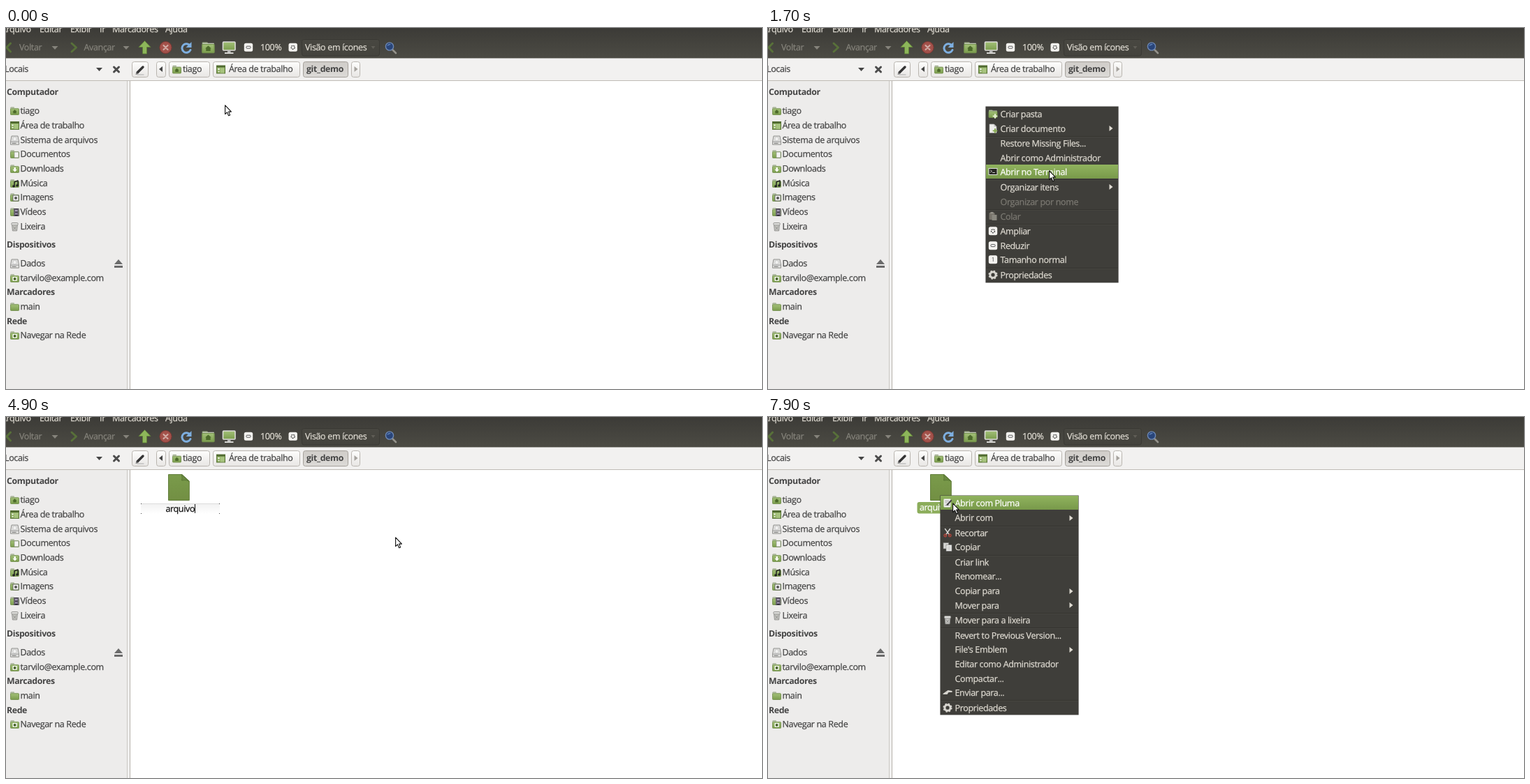
Animation of 1082 by 518 pixels, one loop 8000 ms. Source, as an HTML page:

```html
<!DOCTYPE html>
<html lang="pt-BR">
<head>
<meta charset="utf-8">
<title>Criar arquivo</title>
<style>
html, body { margin: 0; width: 100%; height: 100%; overflow: hidden; background: #fff; }
svg { display: block; width: 100vw; height: 100vh; }
text { --ink: #444; font: 12.5px "Open Sans", "Noto Sans", sans-serif; letter-spacing: -.35px; fill: var(--ink); stroke: var(--ink); stroke-width: .25px; text-rendering: geometricPrecision; white-space: pre; }
.bold { font-weight: 700; font-size: 12.3px; stroke: none; }
.light { --ink: #dfdbd2; }
.dim { --ink: #85837b; }
.off { --ink: #7b7972; }
.mid { --ink: #111; text-anchor: middle; }
.hot { --ink: #fff; }
</style>
</head>
<body>
<svg id="stage" viewBox="0 0 1082 518" preserveAspectRatio="none"></svg>
<script>
const LOOP = 8000;

// Drawing helpers
const rect = (x, y, w, h, fill, more = '') =>
  `<rect x="${x}" y="${y}" width="${w}" height="${h}" fill="${fill}" ${more}/>`;
const path = (d, fill, more = '') => `<path d="${d}" fill="${fill}" ${more}/>`;
const line = (d, color, width = 1) =>
  path(d, 'none', `stroke="${color}" stroke-width="${width}" stroke-linecap="round" stroke-linejoin="round"`);
const disc = (x, y, r, fill, more = '') => `<circle cx="${x}" cy="${y}" r="${r}" fill="${fill}" ${more}/>`;
const text = (x, y, s, cls = '', more = '') => `<text x="${x}" y="${y}" class="${cls}" ${more}>${s}</text>`;
const group = (id, body) => `<g id="${id}">${body}</g>`;
const place = (x, y, body) => `<g transform="translate(${x} ${y})">${body}</g>`;
const fade = (id, a, b) =>
  `<linearGradient id="${id}" x2="0" y2="1"><stop stop-color="${a}"/><stop offset="1" stop-color="${b}"/></linearGradient>`;
const base = c => Math.round(c + 4.3);

const down = (x, y, color) => path(`M${x} ${y}h9l-4.5 5z`, color);
const side = (x, y, color) => path(`M${x} ${y - 4}v8l5 -4z`, color);

// Icons are drawn in a 13 x 12 box
const house = path('M6.5 4.2L9.5 7H8.7V9.6H4.3V7H3.5z', '#4c6a2a');
const folder = rect(.5, .5, 5.5, 4, '#8a9a74', 'rx=".8"') + rect(1, 1.6, 11.2, 3, '#dfe3d8') +
  rect(.5, 2.8, 12, 8.7, 'url(#leaf)', 'rx=".8" stroke="#738f4d" stroke-width=".9"');
const trash = path('M2.6 3.5H10.4L9.6 12H3.4z', '#c4c4c0', 'stroke="#858582" stroke-width=".8"') +
  rect(1.8, .5, 9.4, 3.4, '#dededb', 'rx="1.4" stroke="#858582" stroke-width=".8"') +
  line('M4.500 6l3.500 4M8.500 6l-3.500 4', '#8b8b88', .9);
const sheet = path('M1.5 0H8L11.5 3.5V12.5H1.5z', '#eeeeec', 'stroke="#aaa" stroke-width=".7"') +
  path('M8 0V3.5H11.5z', '#bbb');
const plus = line('M9.5 7v5M7 9.5h5', '#e7f3d4', 2);
const knob = mark => rect(.3, .3, 12.4, 12, '#f3f2ef', 'rx="2.5"') + mark;
const gear = disc(6.5, 6.2, 4.1, 'none', 'stroke="#d8d6d0" stroke-width="3"') +
  disc(6.5, 6.2, 5.7, 'none', 'stroke="#d8d6d0" stroke-width="1.8" stroke-dasharray="2.3 2.2"');
const zoomIn = knob(disc(6.5, 6.3, 2.5, 'none', 'stroke="#444" stroke-width="1.4" stroke-dasharray="2 1"'));
const zoomOut = knob(rect(3.5, 4.7, 6, 3, '#fff', 'rx="1" stroke="#555"'));

const icon = {
  home: folder + house,
  desk: rect(.5, .5, 12, 11, 'url(#leaf)', 'stroke="#5d773c"') + rect(.5, .5, 12, 2.5, '#506a30') +
    rect(2.5, 4.5, 2, 2, '#fff') + rect(2.5, 8, 2, 2, '#e4edd6') + rect(5.5, 4, 6, 7, '#a7c37f'),
  drive: path('M2 0H11L12.5 8V12.3H.5V8z', '#dededc', 'stroke="#8b8b88" stroke-width=".9"') +
    line('M1 8.2h11', '#999') + line('M3 10.4h5', '#777') + disc(6.5, 4.2, 2.6, '#f2f2f1', 'stroke="#bbb" stroke-width=".6"'),
  docs: folder + rect(6, 3, 6, 8, '#f4f4f2', 'stroke="#8a8a88" stroke-width=".6"'),
  down: folder + path('M5.5 4h2.4v3h2l-3.2 3.6L3.5 7h2z', '#fff'),
  music: folder + line('M6 10V4l5 -2v7', '#222', 1.5) + disc(5, 10, 1.8, '#222') + disc(10, 9, 1.8, '#222'),
  photo: folder + rect(4, 3, 8, 8, '#f2f2f0', 'stroke="#555" stroke-width=".8"') + disc(8, 7, 2, '#555'),
  film: folder + rect(5, 1, 7.5, 11, '#35313c') + rect(7, 2.5, 3.5, 3, '#a79bb6') + rect(7, 7, 3.5, 3, '#8d819d') +
    line('M6 2v9M11.6 2v9', '#ddd', .6),
  net: folder + rect(3.4, 4, 6.4, 6, '#f2f5ec', 'rx="1"') + disc(6.6, 7, 1.9, '#46602a'),
  trash, folder, gear, zoomIn, zoomOut,
  newFolder: folder + plus,
  newDoc: sheet + line('M9.5 7v5M7 9.5h5', '#86a850', 2),
  sheet,
  term: rect(.5, 1.5, 12, 9, '#262622', 'stroke="#ddd"') + line('M3 4l2 1.5l-2 1.5M6 7.5h3', '#ddd', .9),
  paste: rect(1, 1, 8, 10, '#77736a', 'rx="1"') + rect(5, 4, 7, 8, '#8a887f') + rect(3, 0, 4, 2.5, '#96938a'),
  zoomOne: knob(line('M5.6 4l1.2 -.8v5.5', '#777', 1)),
  edit: rect(1, .5, 10, 12, '#eee', 'rx="1"') + line('M3 3.5h5M3 6h3M3 9.5h6', '#999') + line('M11.5 3L6 9', '#444', 2.2),
  cut: line('M3 .5L9 9M10 .5L4 9', '#d5d5d2', 1.5) + disc(3.2, 10, 1.7, 'none', 'stroke="#b0443b" stroke-width="1.4"') +
    disc(9.8, 10, 1.7, 'none', 'stroke="#b0443b" stroke-width="1.4"'),
  copy: rect(.5, .5, 7.5, 8.5, '#d5d5d2', 'stroke="#777" stroke-width=".6"') +
    rect(4.5, 3.5, 8, 9, '#efefed', 'stroke="#777" stroke-width=".6"') + line('M6.5 6h4M6.5 8h4M6.5 10h4', '#aaa', .8),
  send: path('M0 8L7 3L13 4V6H8L6 9H0z', '#d5d3cd')
};

// Window
const caption = [[-7, 'Arquivo'], [48, 'Editar'], [92, 'Exibir'], [134, 'Ir'], [152, 'Marcadores'], [228, 'Ajuda']];

const toolbar = rect(0, 0, 1082, 43.4, 'url(#bar)') +
  caption.map(([x, s]) => text(x, 6, s, 'light')).join('') +
  line('M6.5 22L1 28l5.5 6', '#58703a', 3) + text(19, 32, 'Voltar', 'dim') + down(65.5, 26, '#85837b') +
  line('M94 22l6.5 6l-6.5 6', '#58703a', 3) + text(111.5, 32, 'Avançar', 'dim') + down(167.5, 26, '#85837b') +
  path('M198.5 18.5L207 27.5H201.5V37H195.5V27.5H190z', '#8db65a', 'stroke="#5f8035" stroke-width=".8"') +
  disc(228.5, 28, 8.6, '#a3514a', 'stroke="#7c3833"') + line('M225.5 25l6 6M231.5 25l-6 6', '#d1aaa3', 2.2) +
  line('M263.5 25.5A6.3 6.3 0 1 0 264 31.5', '#7eafe0', 3) + path('M265.5 20V28H257.5z', '#7eafe0') +
  `<g transform="translate(280 19.5) scale(1.45 1.4)">${icon.home}</g>` +
  rect(310.5, 20, 17.5, 12, 'url(#leaf)', 'rx="1" stroke="#dcdcd8" stroke-width="1.6"') +
  rect(317, 32.5, 4.5, 3, '#bbb') + rect(313, 35, 12.5, 2, '#d6d6d2') +
  place(340.5, 21.5, zoomOut) + text(364, 32, '100%', 'light') + place(404.2, 21.5, zoomIn) +
  rect(423.5, 16.5, 111, 23.5, 'url(#combo)', 'rx="3" stroke="#3a3934"') +
  text(428, 32, 'Visão em ícones', 'light') + path('M522.5 26h6l-3 4z', '#5f5d56') +
  line('M553.5 31.5l4.5 4.5', '#94928b', 2.6) + disc(549, 26.5, 5.6, '#29457a', 'stroke="#6f89b3" stroke-width="1.4"') +
  path('M545.5 26A3.5 3.5 0 0 1 551 23.5z', '#5f82b8');

const button = (x, w, pressed) => rect(x + .5, 48.5, w - 1, 22, pressed ? 'url(#press)' : 'url(#btn)',
  `rx="3" stroke="${pressed ? '#a5a19b' : '#b9b5af'}"`);

const pathbar = rect(0, 43, 1082, 32, '#f2f1f0') + rect(0, 75, 1082, 1, '#bfbbb5') +
  text(-2, 63, 'Locais') + down(129, 57, '#444') + line('M154.5 56l7 7M161.5 56l-7 7', '#4c4c4c', 3) +
  button(180, 24) + line('M188 64l8 -8', '#333', 3.4) + path('M185.5 67l1 -4l3 3z', '#777') + line('M188 67h9', '#aaa') +
  button(215, 14) + path('M224 55v8l-5 -4z', '#444') +
  button(233, 59) + place(238, 53.5, icon.home) + text(253, 63, 'tiago') +
  button(296, 125) + place(301, 53.5, icon.desk) + text(319, 63, 'Área de trabalho') +
  button(425, 65, true) + text(430, 63, 'git_demo', 'bold') +
  button(494, 13) + side(498.5, 59, '#a5a29d');

const places = [
  [119, 'tiago', 'home'], [140, 'Área de trabalho', 'desk'], [160.5, 'Sistema de arquivos', 'drive'],
  [181, 'Documentos', 'docs'], [202, 'Downloads', 'down'], [222.5, 'Música', 'music'], [243, 'Imagens', 'photo'],
  [264, 'Vídeos', 'film'], [284.5, 'Lixeira', 'trash'], [338, 'Dados', 'drive'], [358.5, 'tarvilo@example.com', 'net'],
  [400, 'main', 'folder'], [441, 'Navegar na Rede', 'net']
];
const heads = [[92, 'Computador'], [311, 'Dispositivos'], [379, 'Marcadores'], [420.5, 'Rede']];

const sidebar = rect(0, 76, 174, 442, '#edeceb') + rect(173, 76, 1, 442, '#cbc8c4') +
  rect(174, 76, 3, 442, '#f2f1f0') + rect(177, 76, 1, 442, '#b8b4ae') +
  heads.map(([c, s]) => text(1, base(c), s, 'bold')).join('') +
  places.map(([c, s, i]) => place(6, Math.round(c - 6), icon[i]) + text(20.5, base(c), s)).join('') +
  path('M161 332L167 339H155z', '#6b6b6b') + rect(155, 341, 12, 3, '#6b6b6b');

// Menus: rows are [centre, label, icon, flags], with > for a submenu and x for disabled
const menus = {
  main: { x: 311, y: 113, w: 191, h: 252, arrow: 488.5, seps: [155, 217.5, 260, 281, 344], rows: [
    [124, 'Criar pasta', 'newFolder'], [144.5, 'Criar documento', 'newDoc', '>'], [166, 'Restore Missing Files...'],
    [186.5, 'Abrir como Administrador'], [207, 'Abrir no Terminal', 'term'], [228.5, 'Organizar itens', '', '>'],
    [249.5, 'Organizar por nome', '', 'x'], [270.5, 'Colar', 'paste', 'x'], [292, 'Ampliar', 'zoomIn'],
    [312.5, 'Reduzir', 'zoomOut'], [333, 'Tamanho normal', 'zoomOne'], [354.5, 'Propriedades', 'gear']] },
  sub: { x: 501, y: 134, w: 188, h: 42, tx: 521, seps: [155], rows: [
    [144.5, 'Nenhum modelo instalado', '', 'x'], [166, 'Arquivo vazio', 'sheet']] },
  file: { x: 246, y: 113, w: 199, h: 314, arrow: 431.5, seps: [156, 198, 281.5, 302.5, 406.5], rows: [
    [124, 'Abrir com Pluma', 'edit'], [145, 'Abrir com', '', '>'], [166.5, 'Recortar', 'cut'], [187, 'Copiar', 'copy'],
    [208.5, 'Criar link'], [229, 'Renomear...'], [250, 'Copiar para', '', '>'], [270.5, 'Mover para', '', '>'],
    [292, 'Mover para a lixeira', 'trash'], [313.5, 'Revert to Previous Version...'], [334, 'File\'s Emblem', '', '>'],
    [354.5, 'Editar como Administrador'], [375.5, 'Compactar...'], [396, 'Enviar para...', 'send'],
    [417.5, 'Propriedades', 'gear']] }
};

const menu = id => {
  const { x, y, w, h, arrow, seps, rows, tx = x + 21.5 } = menus[id];
  const body = rect(x + .4, y - .5, w - .8, h + 1, '#3f3e3a') +
    seps.map(s => rect(x + 1, Math.floor(s), w - 2, 1, '#353430') + rect(x + 1, Math.floor(s) + 1, w - 2, 1, '#464540')).join('') +
    rect(x + 1, y, w - 2, 20, 'url(#hot)', `id="${id}Hot"`) +
    rows.map(([c, s, i, f]) => (i ? place(tx - 17, Math.round(c - 7), icon[i]) : '') +
      text(tx, base(c), s, f === 'x' ? 'off' : 'light') + (f === '>' ? side(arrow, Math.round(c - .5), '#dfdbd2') : '')).join('');
  return group(id, body);
};

// New file: icon, name field and label
const page = 'M232.5 82.5H252L262.3 92V119.5H232.5z';
const file = group('doc', path(page, 'url(#doc1)', 'id="page" stroke="#587632" stroke-width=".9"') +
  path('M251.5 83Q252.5 88 251.5 91Q257 89.5 262 92z', '#6a8940', 'id="fold" stroke="#557232" stroke-width=".8"'));
const field = group('field', rect(193, 124, 113, 15, 'url(#well)') + rect(194, 124, 111, 1, '#dcdcdc') +
  [[193, 124], [305, 124], [193, 138], [305, 138]].map(([x, y]) => rect(x, y, 1, 1, '#444')).join('') +
  rect(213, 124.5, 72.5, 14.5, '#8fae61', 'id="picked"') +
  text(249.3, 136, '', 'mid', 'id="name"') + rect(0, 125, 1, 13, '#111', 'id="caret"'));
const label = group('label', rect(213.5, 122, 68.5, 16.5, '#8cad5b', 'rx="3"') + text(217, 134, 'arquivo.txt', 'hot'));
const pointer = group('pointer', path('M.6 .9V13.6L3.5 10.9L5.5 15.8L7.6 14.9L5.6 10.1H9.4z', '#fff',
  'stroke="#111" stroke-width="1.1" stroke-linejoin="round"'));

const $ = id => document.getElementById(id);
$('stage').innerHTML = '<defs>' + fade('leaf', '#a3c078', '#7b9d4d') + fade('bar', '#3c3b37', '#4c4b44') +
  fade('combo', '#484741', '#44433d') + fade('btn', '#fdfdfc', '#e8e6e4') + fade('press', '#cfccc8', '#dcdad7') +
  fade('hot', '#90b35e', '#78994a') + fade('doc1', '#7a9b4b', '#728f43') + fade('well', '#f1f1f1', '#fff') + '</defs>' +
  rect(0, 0, 1082, 518, '#fff') + pathbar + toolbar + sidebar + file + field + label +
  menu('main') + menu('sub') + menu('file') + pointer;

// Timetable: [ms, value...]
const moves = [
  [0, 313, 110], [100, 310, 110], [600, 314, 135], [700, 326, 205], [800, 336, 290], [900, 340, 342],
  [1000, 336, 232], [1100, 331, 138], [1200, 333, 141], [1400, 346, 149], [1500, 362, 164], [1600, 382, 184],
  [1700, 402, 204], [1800, 416, 213], [1900, 436, 196], [2000, 456, 172], [2100, 474, 151], [2200, 489, 145],
  [2300, 517, 147], [2400, 541, 149], [3300, 557, 172], [6900, 560, 170], [7100, 303, 121], [7400, 245, 110],
  [7700, 243, 110], [7900, 264, 123]
];
const typed = [[0, ''], [3300, 'novo arquivo'], [3800, 1], [4200, 2], [4400, 4], [4600, 5], [4900, 7], [5600, 8], [5800, 10], [6000, 11]];
const spans = {
  main: [[300, 3300]], sub: [[1200, 1500], [2200, 3300]], file: [[7700, LOOP]],
  doc: [[3300, LOOP]], field: [[3300, 6400]], label: [[6400, LOOP]]
};

const at = (table, t) => table.findLast(row => row[0] <= t).slice(1);
const show = (id, on) => { $(id).style.display = on ? '' : 'none'; };

// Centre of the row under the pointer, or 0; an open submenu keeps its parent row lit
function hover(id, x, y) {
  if (id === 'main' && x > 501) return 144.5;
  const m = menus[id];
  const row = x >= m.x && x < m.x + m.w - 1 && m.rows.find(([c, , , f]) => f !== 'x' && Math.abs(y - c) <= 10.4);
  return row ? row[0] : 0;
}

function draw(t) {
  for (const id in spans) show(id, spans[id].some(([a, b]) => t >= a && t < b));

  const [x, y] = at(moves, t);
  $('pointer').setAttribute('transform', `translate(${x} ${y})`);
  for (const id in menus) {
    const c = hover(id, x, y);
    show(id + 'Hot', c);
    $(id + 'Hot').setAttribute('y', Math.floor(c - 10.5));
    for (const row of $(id).querySelectorAll('text')) row.classList.toggle('hot', c && +row.getAttribute('y') === base(c));
  }

  const lit = t >= 7400 && t < 7700;
  $('page').setAttribute('fill', lit ? '#88a853' : 'url(#doc1)');
  $('page').setAttribute('stroke', lit ? '#80a04d' : '#587632');
  show('fold', !lit);

  const [part] = at(typed, t);
  const fresh = typeof part === 'string';
  const name = $('name');
  const value = fresh ? part : 'arquivo.txt'.slice(0, part);
  if (name.textContent !== value) name.textContent = value;
  name.classList.toggle('hot', fresh);
  show('picked', fresh);
  show('caret', !fresh);
  if (!fresh && t < 6400) $('caret').setAttribute('x', Math.round(249.3 + name.getComputedTextLength() / 2));
}

const start = performance.now();
function tick(now) {
  draw(Math.max(0, now - start) % LOOP);
  requestAnimationFrame(tick);
}
draw(0);
requestAnimationFrame(tick);
</script>
</body>
</html>
```
